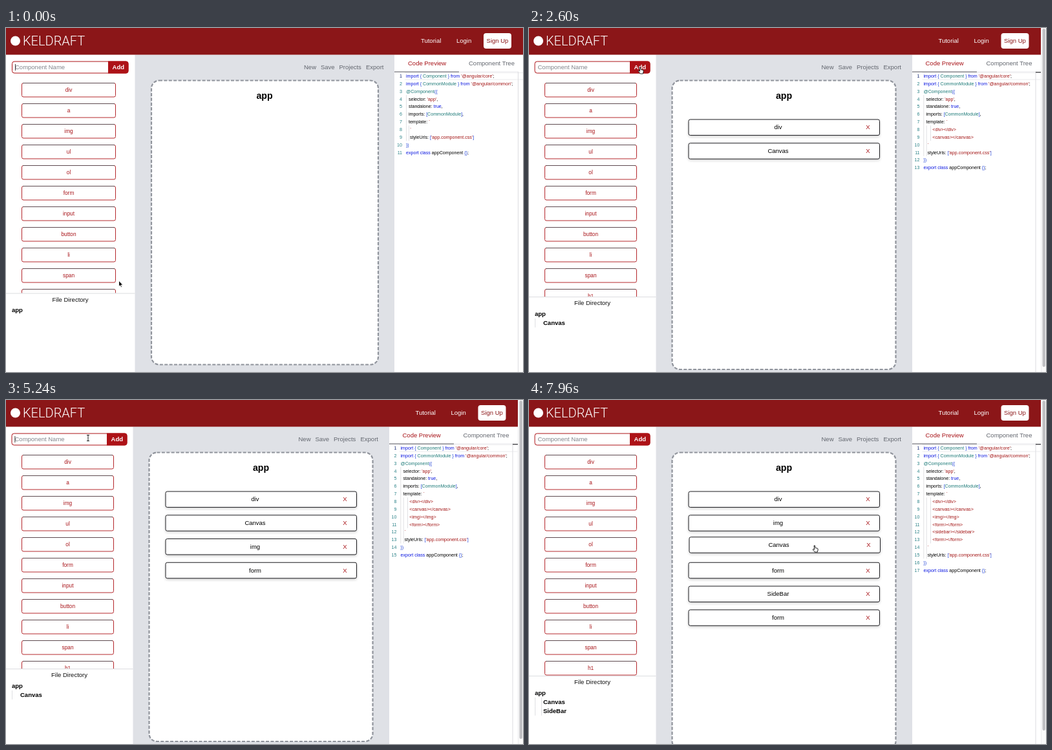
Animation of 800 by 534 pixels, one loop 8000 ms. Source, as an HTML page with a canvas:

```html
<!DOCTYPE html>
<html lang="en">
<head>
<meta charset="utf-8">
<title>Component builder</title>
<style>
html, body { margin: 0; width: 100%; height: 100%; overflow: hidden; background: #fff; }
canvas { display: block; width: 800px; height: 534px; }
</style>
</head>
<body>
<canvas id="stage" width="800" height="534"></canvas>
<script>
const ctx = document.getElementById('stage').getContext('2d');
const LOOP = 8000;
const RED = '#ad1217', BAR = '#8b1618', TEXT_RED = '#a81318', GREY = '#62666e';
const SANS = '"Liberation Sans", Arial, sans-serif';
const TAGS = ['div', 'a', 'img', 'ul', 'ol', 'form', 'input', 'button', 'li', 'span', 'h1'];

// Page geometry before and after the page scrollbar appears
const WIDE = { left: 199.5, right: 601, inX: 9, addX: 158, addEnd: 189.5, btnW: 146, boxX: 225, boxW: 351,
  rowX: 250, rowW: 300.5, rowMid: 391, rowDel: 533, title: 400, shift: 0, dirMid: 99.5 };
const NARROW = { left: 196.5, right: 593, inX: 8.5, addX: 156, addEnd: 187.5, btnW: 143, boxX: 221.5, boxW: 346,
  rowX: 247, rowW: 295.5, rowMid: 385.5, rowDel: 524.5, title: 394.5, shift: -8.5, dirMid: 98 };

const ADD_ONE = 2520, ADD_TWO = 5880, REORDER = 7600, SWAP = 7720;
const ITEMS = [[880, 'div'], [ADD_ONE, 'Canvas'], [3880, 'img'], [4560, 'form'], [ADD_TWO, 'SideBar'], [7080, 'form']];
const TYPING = [[1800, 95, 'Canvas', ADD_ONE], [5300, 70, 'SideBar', ADD_TWO]];
const FOCUS = [[0, 420], [1410, ADD_ONE], [5150, ADD_TWO]];
// start, end, tag index, grab point
const DRAGS = [[440, 880, 0, 150, 95], [3420, 3880, 2, 150, 158], [4140, 4560, 5, 153, 252], [6500, 7080, 5, 153, 252]];
const LAG = 60;
// time, x, y of the pointer
const PATH = [
  [0, 174.5, 392], [40, 174.5, 392], [400, 150, 95], [440, 150, 95], [840, 400, 262], [900, 400, 262],
  [1400, 140, 63], [2260, 140, 63], [2440, 172, 61], [2600, 172, 61], [3340, 150, 158], [3420, 150, 158],
  [3480, 158, 181.5], [3800, 370, 235], [3900, 370, 235], [4100, 153, 252], [4140, 153, 252], [4340, 382, 278],
  [4600, 382, 278], [5100, 127, 59], [5700, 127, 59], [5820, 172, 61], [5960, 172, 61], [6440, 153, 252],
  [6500, 153, 252], [6620, 288, 322], [6680, 302, 339], [6900, 382, 344], [7100, 382, 344], [7480, 441, 192],
  [7600, 441, 192], [7890, 442, 226], [8000, 442, 226]
];

const clamp = v => Math.max(0, Math.min(1, v));
const ease = v => v * v * (3 - 2 * v);
const rowY = i => 141.5 + 36.75 * i;
const tagY = i => 85 + 32 * i;

function pointerAt(t) {
  let i = 1;
  while (i < PATH.length - 1 && t > PATH[i][0]) i++;
  const [t0, x0, y0] = PATH[i - 1], [t1, x1, y1] = PATH[i];
  const p = ease(clamp((t - t0) / (t1 - t0)));
  return { x: x0 + (x1 - x0) * p, y: y0 + (y1 - y0) * p };
}

function text(str, x, cy, color, size = 9.5, align = 'left', weight = 400) {
  ctx.font = `${weight} ${size}px ${SANS}`;
  ctx.textAlign = align;
  ctx.fillStyle = color;
  ctx.fillText(str, x, cy + size * 0.36);
}

function rect(x, y, w, h, color) {
  ctx.fillStyle = color;
  ctx.fillRect(x, y, w, h);
}

function round(x, y, w, h, r, fill, stroke) {
  ctx.beginPath();
  ctx.roundRect(x, y, w, h, r);
  if (fill) { ctx.fillStyle = fill; ctx.fill(); }
  if (stroke) { ctx.strokeStyle = stroke; ctx.lineWidth = 1; ctx.stroke(); }
}

function drawHeader(g) {
  rect(0, 0, 800, 41.5, BAR);
  ctx.beginPath();
  ctx.arc(14.5, 20, 7.5, 0, 7);
  ctx.fillStyle = '#fff';
  ctx.fill();
  ctx.font = '300 20px Roboto, sans-serif';
  ctx.textAlign = 'left';
  ctx.fillText('KELDRAFT', 26, 27.3);
  text('Tutorial', 642 + g.shift, 20, '#fff');
  text('Login', 697 + g.shift, 20, '#fff');
  round(739 + g.shift, 8, 43, 24, 4, '#fff');
  text('Sign Up', 760.5 + g.shift, 20, BAR, 9.5, 'center');
}

function drawTag(i, x, y, w, filled) {
  round(x + 0.5, y + 0.5, w - 1, 21.5, 2.5, filled ? RED : '#fff', '#b5282d');
  if (!filled) rect(x + 2, y, w - 4, 1, '#5e4a50');
  text(TAGS[i], x + w / 2, y + 11, filled ? '#fff' : TEXT_RED, 8.3, 'center');
}

function drawInput(g, t) {
  round(g.inX + 0.5, 52, g.addEnd - g.inX - 1, 18, 3.5, '#fff', RED);
  round(g.addX, 51.5, g.addEnd - g.addX, 19, [0, 4, 4, 0], RED);
  text('Add', (g.addX + g.addEnd) / 2, 61, '#fff', 9.5, 'center', 700);
  const job = TYPING.find(j => t >= j[0] && t < j[3]);
  const typed = job ? job[2].slice(0, 1 + Math.floor((t - job[0]) / job[1])) : '';
  const x = g.inX + 5;
  text(typed || 'Component Name', x, 61, typed ? '#111' : '#82858c');
  const focus = FOCUS.find(f => t >= f[0] && t < f[1]);
  if (focus && (typed || (t - focus[0]) % 1060 < 530)) {
    rect(x + (typed ? ctx.measureText(typed).width : 0), 56, 0.8, 10, '#111');
  }
}

function drawSidebar(g, t, dirTop, mouse, dragging) {
  drawInput(g, t);
  ctx.save();
  ctx.beginPath();
  ctx.rect(0, 80, g.left, dirTop - 80);
  ctx.clip();
  TAGS.forEach((_, i) => {
    const y = tagY(i);
    const over = !dragging && mouse.y < dirTop && inside(mouse, 24, y, g.btnW, 22);
    drawTag(i, 24, y, g.btnW, over);
  });
  ctx.restore();
  rect(0, dirTop, g.left, 1, '#dcdde0');
  text('File Directory', g.dirMid, dirTop + 10, '#111', 9.5, 'center');
  text('app', 9, dirTop + 26.5, '#000', 9.5, 'left', 700);
  const files = t < ADD_ONE ? [] : t < ADD_TWO ? ['Canvas'] : ['Canvas', 'SideBar'];
  files.forEach((name, i) => {
    const y = dirTop + 40.8 + 14 * i;
    rect(9, y - 7, 0.8, 14, '#d8d9dc');
    if (files.length > 1) rect(19, y - 7, 0.8, 14, '#d8d9dc');
    text(name, 22, y, '#000', 9.5, 'left', 700);
  });
}

function drawRow(g, name, x, y) {
  ctx.save();
  ctx.shadowColor = 'rgba(0,0,0,.22)';
  ctx.shadowBlur = 4;
  ctx.shadowOffsetY = 2;
  round(x, y + 0.5, g.rowW, 24.5, 2.5, '#fff');
  ctx.restore();
  round(x, y + 0.5, g.rowW, 24.5, 2.5, null, '#1c1c20');
  text(name, x + g.rowMid - g.rowX, y + 12.5, '#000', 9.5, 'center');
  text('X', x + g.rowDel - g.rowX, y + 12.5, TEXT_RED, 9.5, 'center');
}

function drawBoard(g, t, rows) {
  rect(g.left, 41.5, g.right - g.left, 493, '#dfe1e6');
  [['New', 461], ['Save', 487], ['Projects', 515.5], ['Export', 557]]
    .forEach(([label, x]) => text(label, x + g.shift, 61, GREY));
  const bottom = t < ADD_ONE ? 522.5 : t < ADD_TWO ? 530 : 542;
  round(g.boxX, 81.5, g.boxW, bottom - 81.5, 12, '#fff');
  ctx.setLineDash([5, 2.4]);
  ctx.strokeStyle = '#90949c';
  ctx.lineWidth = 2.2;
  ctx.stroke();
  ctx.setLineDash([]);
  text('app', g.title, 105, '#000', 14.2, 'center', 700);

  const slide = ease(clamp((t - SWAP) / 180));
  rows.forEach((name, i) => {
    if (t >= REORDER && i === 1) return;
    drawRow(g, name, g.rowX, rowY(t >= REORDER && i === 2 ? 2 - slide : i));
  });
  if (t >= REORDER) {
    const p = pointerAt(t - LAG);
    drawRow(g, rows[1], g.rowX + p.x - 441, rowY(1) + p.y - 192);
  }
}

// Each part of a line starts with its colour key
const INK = { k: '#0a16e0', b: '#1c3fd6', t: '#1d7a78', s: '#a31515', p: '#000' };
const HEAD = [
  "kimport |b{ |tComponent|b } |kfrom |s'@angular/core'|p;",
  "kimport |b{ |tCommonModule|b } |kfrom |s'@angular/common'|p;",
  't@Component|b({', "p  selector: |s'app'|p,", 'p  standalone: |ktrue|p,',
  'p  imports: |b[|tCommonModule|b]|p,', 'p  template: |s`'
];
const TAIL = ['s   `', "p   styleUrls: |b[|s'app.component.css'|b]", 'b})', 'kexport class |pappComponent |b{}|p;'];

function drawCode(g, rows) {
  const s = g.shift;
  rect(g.right, 41.5, 800 - g.right, 493, '#fff');
  text('Code Preview', 622 + s, 55, TEXT_RED);
  text('Component Tree', 716 + s, 55, GREY);
  rect(g.right, 67.5, 192, 0.8, '#e4e4e8');
  rect(g.right, 67.5, 100, 1.2, '#77777d');
  rect(617 + s, 69, 183, 1, '#ececee');
  rect(617 + s, 79.5, 183, 1, '#ececee');
  rect(792 + s, 68, 1, 466, '#dcdce0');
  if (s) rect(784, 68, 8, 1.4, '#4a4a4e');

  const tags = rows.map(n => n.toLowerCase()).map(n => `s       <${n}></${n}>`);
  const lines = [...HEAD, ...tags, ...TAIL];
  const closing = lines.length - 2;
  lines.forEach((line, i) => {
    const y = 74.5 + 11.85 * i;
    text(i + 1, 613 + s, y, i ? '#2b8288' : '#0b216f', 7.1, 'right');
    const guides = i < 3 || i >= closing ? [] : i < 7 ? [619] : i < 7 + tags.length ? [619, 623.3, 629.5] : [619, 623.3];
    guides.forEach(x => rect(x + s, y - 6, 0.7, 11.9, '#d4d4d8'));
    let x = 619 + s;
    line.split('|').forEach(part => {
      text(part.slice(1), x, y, INK[part[0]], 7.1);
      x += ctx.measureText(part.slice(1)).width;
    });
  });
}

function inside(m, x, y, w, h) {
  return m.x >= x && m.x <= x + w && m.y >= y && m.y <= y + h;
}

function shape(points, x, y, fill, stroke) {
  ctx.beginPath();
  points.forEach(([px, py]) => ctx.lineTo(x + px, y + py));
  ctx.closePath();
  ctx.lineJoin = 'round';
  ctx.lineWidth = 1;
  ctx.fillStyle = fill;
  ctx.strokeStyle = stroke;
  ctx.fill();
  ctx.stroke();
}

const ARROW = [[0, 0], [0, 9.5], [2.1, 7.6], [3.4, 10.8], [5, 10.1], [3.7, 7], [6.6, 7]];
const HAND = [[-1, 0], [0.4, 0], [1, 3.6], [4.6, 4.3], [5.2, 6], [4.4, 10], [0.2, 10], [-2.8, 6.2], [-2, 5.2], [-0.4, 6.2]];

function drawPointer(kind, { x, y }) {
  if (kind === 'text') {
    rect(x - 0.5, y - 4.5, 1, 9, '#222');
    rect(x - 2, y - 5, 4, 1, '#222');
    rect(x - 2, y + 4, 4, 1, '#222');
  } else if (kind === 'hand') {
    shape(HAND, x, y, '#fff', '#222');
  } else {
    shape(ARROW, x, y, '#111', '#fff');
  }
}

function pointerKind(g, t, mouse, rows, drag, dirTop) {
  if (drag) return t - drag[0] > 100 ? 'hand' : 'arrow';
  if (inside(mouse, g.inX, 51, g.addX - g.inX, 20)) return 'text';
  const onTag = mouse.y < dirTop && TAGS.some((_, i) => inside(mouse, 24, tagY(i), g.btnW, 22));
  const onRow = rows.some((_, i) => inside(mouse, g.rowX, rowY(i), g.rowW, 25));
  const onAdd = inside(mouse, g.addX, 51, g.addEnd - g.addX, 20);
  return t >= REORDER || onTag || onRow || onAdd ? 'hand' : 'arrow';
}

function draw(t) {
  const g = t < ADD_ONE ? WIDE : NARROW;
  const dirTop = t < ADD_ONE ? 411.5 : t < ADD_TWO ? 417 : 428;
  const rows = ITEMS.filter(e => t >= e[0]).map(e => e[1]);
  const drag = DRAGS.find(d => t >= d[0] && t < d[1]);
  const mouse = pointerAt(t);

  rect(0, 0, 800, 534, '#fff');
  drawBoard(g, t, rows);
  drawSidebar(g, t, dirTop, mouse, drag);
  drawCode(g, rows);
  drawHeader(g);
  if (t >= ADD_ONE) {
    rect(792, 0, 8, 534, '#fafafa');
    rect(792, 0, 0.7, 534, '#e6e6e8');
    round(794.5, 1, 4.5, t < ADD_TWO ? 525 : 512, 2.2, '#bfbfc2');
  }
  if (drag) {
    const [start, , tag, gx, gy] = drag;
    const p = pointerAt(Math.max(start, t - LAG));
    drawTag(tag, 24 + p.x - gx, tagY(tag) + p.y - gy, g.btnW, true);
  }
  drawPointer(pointerKind(g, t, mouse, rows, drag, dirTop), mouse);
}

const begin = performance.now();
function tick() {
  draw((performance.now() - begin) % LOOP);
  requestAnimationFrame(tick);
}
tick();
</script>
</body>
</html>
```
